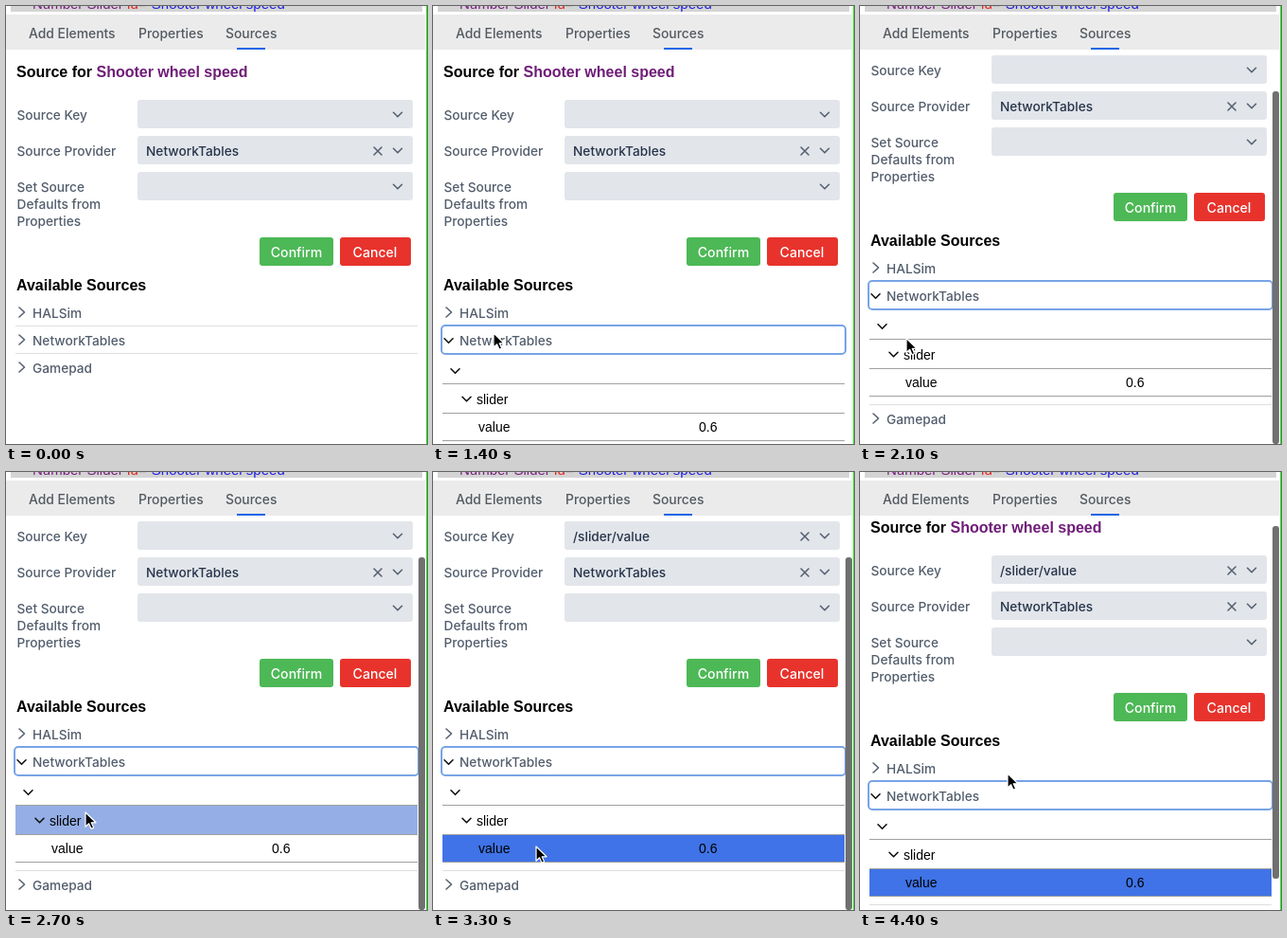
Recreate the animation shown at these times as an HTML page. Size 445x462 px, loop 4500 ms.

```html
<!DOCTYPE html>
<html lang="en">
<head>
<meta charset="utf-8">
<title>Source picker</title>
<style>
  html, body { margin: 0; width: 100%; height: 100%; overflow: hidden; background: #fff; }
  svg { display: block; width: 445px; height: 462px; }
  text { white-space: pre; }
  .ui { font: 500 13.7px Inter, Roboto, sans-serif; fill: #525d6c; }
  .tab { font-size: 13.9px; fill: #535960; }
  .value { fill: #26344a; }
  .btn { font-size: 14.1px; fill: #fff; text-anchor: middle; }
  .head { font: bold 16px "Liberation Sans", Arial, sans-serif; fill: #000; }
  .tree { font: 14px "Liberation Sans", Arial, sans-serif; fill: #000; }
  .code { font: 15px "Liberation Sans", Arial, sans-serif; }
  .icon { fill: none; stroke: #566171; stroke-width: 1.6; stroke-linecap: round; stroke-linejoin: round; }
  .dark { stroke: #111; }
</style>
</head>
<body>
<svg id="stage" viewBox="0 0 445 462">
  <defs><clipPath id="view"><rect y="46" width="445" height="416"/></clipPath></defs>
  <rect width="445" height="462" fill="#fff"/>
  <rect x="5" width="435" height="6" fill="#d4d4d4"/>
  <text class="code" x="28" y="2.5"><tspan fill="#7a2080">Number Slider</tspan><tspan fill="#e0281e"> id</tspan><tspan fill="#444">=</tspan><tspan fill="#2020e0">"Shooter wheel speed"</tspan></text>
  <g clip-path="url(#view)"><g id="page"></g></g>
  <rect y="9" width="443" height="37" fill="#ebebeb"/>
  <g id="tabs"></g>
  <rect x="244" y="44" width="30" height="2" fill="#1a66e6"/>
  <rect id="bar" x="436" width="7" height="372" rx="3" fill="#707070"/>
  <rect x="444" width="1" height="462" fill="#22ff22"/>
  <path id="cursor" d="M0 0V15.2L3.6 11.8L6 17.2L8.6 16.1L6.2 10.8H11Z" fill="#000" stroke="#fff" stroke-width="1.2" stroke-linejoin="round"/>
</svg>
<script>
const NS = 'http://www.w3.org/2000/svg';
const LOOP = 4500, STEP = 100;
const FOCUS_AT = 500, OPEN_AT = 800, SCROLL_AT = 2000, PICK_AT = 3200;
const byId = id => document.getElementById(id);
const page = byId('page');

function add(parent, tag, attrs, content) {
  const el = document.createElementNS(NS, tag);
  for (const key in attrs) el.setAttribute(key, attrs[key]);
  if (content) el.textContent = content;
  parent.appendChild(el);
  return el;
}
const text = (parent, cls, x, y, content) => add(parent, 'text', { class: cls, x, y }, content);
const rect = (parent, x, y, width, height, fill, rx = 0) =>
  add(parent, 'rect', { x, y, width, height, fill, rx });
const icon = (parent, d, cls = '') => add(parent, 'path', { class: 'icon ' + cls, d });
const line = (parent, y, stroke) => add(parent, 'path', { d: `M10 ${y}H435`, stroke });
const down = (parent, x, y, cls) => icon(parent, `M${x - 4.5} ${y - 2.2}l4.5 4.5l4.5 -4.5`, cls);
const right = (parent, x, y) => icon(parent, `M${x - 3} ${y - 5}l5.5 5l-5.5 5`);
const cross = (parent, y) => icon(parent, `M389 ${y - 4}l8 8m0 -8l-8 8`);
const show = (el, on) => el.setAttribute('display', on ? 'inline' : 'none');

[[24, 'Add Elements'], [140, 'Properties'], [232, 'Sources']]
  .forEach(([x, name]) => text(byId('tabs'), 'ui tab', x, 34, name));

// Form
const title = text(page, 'head', 11, 75, 'Source for ');
add(title, 'tspan', { fill: '#6f1d78' }, 'Shooter wheel speed');
[[120, 'Source Key'], [158, 'Source Provider'], [196, 'Set Source'],
 [214, 'Defaults from'], [232, 'Properties']]
  .forEach(([y, label]) => text(page, 'ui', 11.5, y, label));
for (const y of [99, 137, 175]) {
  rect(page, 139, y, 291, 30, '#e2e5ea', 3);
  down(page, 414, y + 15.5);
}
text(page, 'ui value', 148, 158, 'NetworkTables');
cross(page, 153);
const key = add(page, 'g', {});
text(key, 'ui value', 148, 120, '/slider/value');
cross(key, 115);

rect(page, 268, 244, 78, 30, '#4db856', 3);
rect(page, 353, 244, 75, 30, '#e7332c', 3);
text(page, 'ui btn', 307, 264.5, 'Confirm');
text(page, 'ui btn', 390, 264.5, 'Cancel');

// Source list
text(page, 'head', 11, 300, 'Available Sources');
right(page, 17, 323);
text(page, 'ui', 28, 329, 'HALSim');
line(page, 337.5, '#dedede');
text(page, 'ui', 28, 358, 'NetworkTables');

const closed = add(page, 'g', {});
right(closed, 17, 352);
line(closed, 366.5, '#dedede');

const open = add(page, 'g', {});
down(open, 16.5, 353, 'dark');
down(open, 23.5, 385, 'dark');
const rows = [[399, 30], [430, 28]].map(([y, h]) => rect(open, 10, y, 425, h, 'none'));
[398.5, 429.5, 458.5].forEach(y => line(open, y, '#a0a0a0'));
down(open, 35.5, 414.5, 'dark');
text(open, 'tree', 46, 420, 'slider');
text(open, 'tree', 48, 449, 'value');
text(open, 'tree', 281, 449, '0.6');
line(open, 467.5, '#dedede');

const last = add(page, 'g', {});
right(last, 17, 381);
text(last, 'ui', 28, 387, 'Gamepad');

const ring = add(page, 'rect', {
  x: 9, y: 337, width: 427, height: 30, rx: 4, fill: 'none', stroke: '#78a4e6', 'stroke-width': 2
});

// Keys are [time, ...values], joined by straight lines
const pointer = [[400, 66, 332], [500, 64, 345], [1400, 64, 345], [1900, 43, 350],
  [2100, 49, 350.5], [2500, 49, 350.5], [2600, 64, 355], [2700, 84, 359], [2900, 98, 376],
  [3100, 109, 395], [3500, 109, 395], [3600, 132, 366], [3700, 156, 318]];
const scroll = [[1900, 0], [2000, 24], [2100, 47], [4200, 47], [4300, 30], [4400, 11]];

function at(keys, t) {
  const i = keys.findIndex(k => k[0] > t);
  if (i === 0) return keys[0].slice(1);
  if (i < 0) return keys[keys.length - 1].slice(1);
  const a = keys[i - 1], b = keys[i], f = (t - a[0]) / (b[0] - a[0]);
  return a.slice(1).map((v, n) => v + (b[n + 1] - v) * f);
}

function draw(time) {
  const t = Math.floor((time % LOOP) / STEP) * STEP;
  const [x, y] = at(pointer, t);
  const [offset] = at(scroll, t);
  const opened = t >= OPEN_AT, picked = t >= PICK_AT;

  page.setAttribute('transform', `translate(0 ${-offset})`);
  show(byId('bar'), t >= SCROLL_AT);
  byId('bar').setAttribute('y', 47 + offset * 0.917);
  show(byId('cursor'), t >= pointer[0][0]);
  byId('cursor').setAttribute('transform', `translate(${x} ${y})`);
  show(ring, t >= FOCUS_AT);
  show(open, opened);
  show(closed, !opened);
  show(key, picked);
  last.setAttribute('transform', `translate(0 ${opened ? 101 : 0})`);

  const py = y + offset;
  const overSlider = py >= 399 && py < 429.5, overValue = py >= 429.5 && py < 458;
  rows[0].setAttribute('fill', overSlider ? '#95afe6' : 'none');
  rows[1].setAttribute('fill', picked ? '#3f73e7' : overValue ? '#95afe6' : 'none');
}

const start = performance.now();
function tick() {
  draw(performance.now() - start);
  requestAnimationFrame(tick);
}
tick();
</script>
</body>
</html>
```
